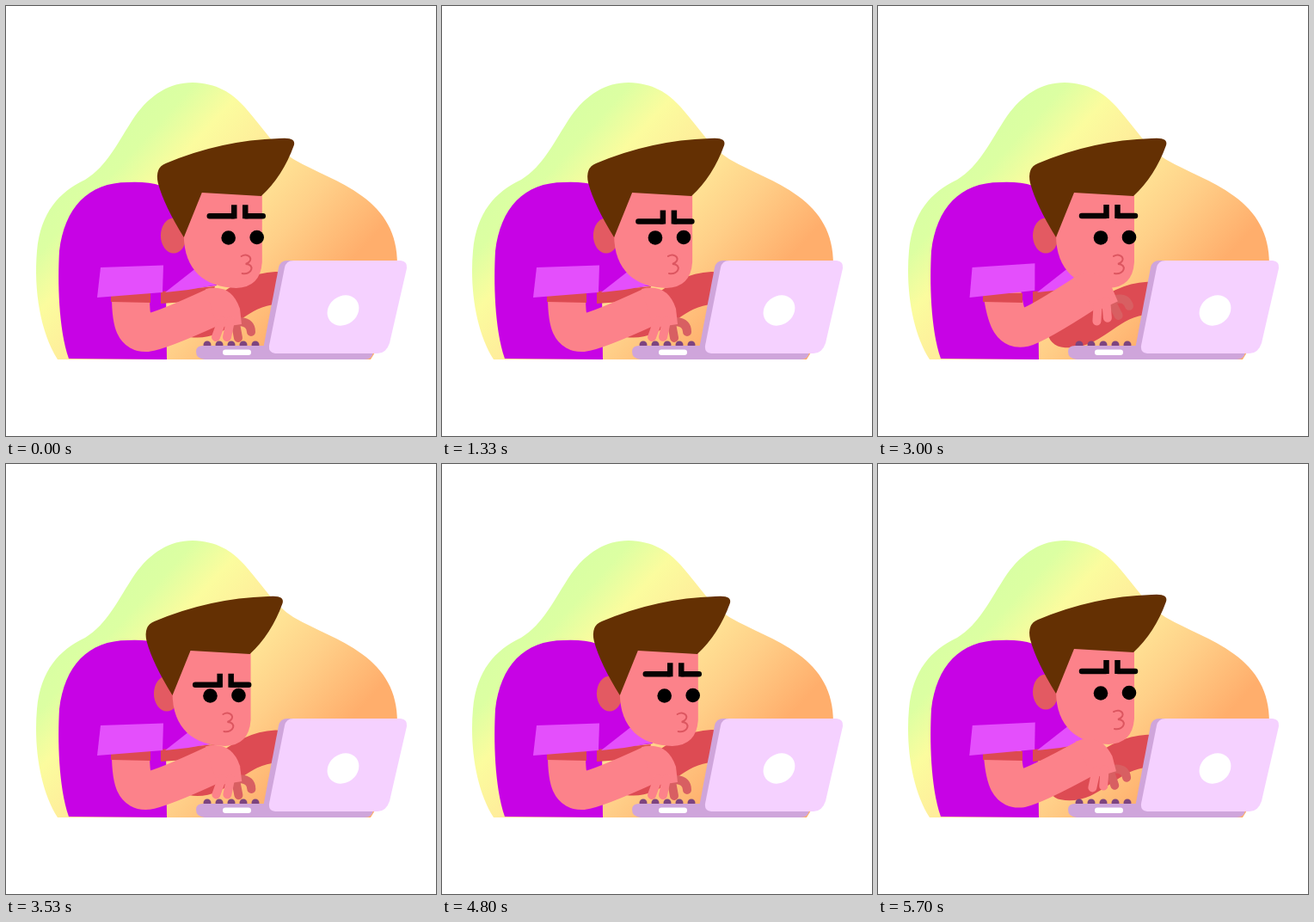
An HTML page without scripts that plays this animation: 500 by 500 pixels, repeating every 5730 ms.

```html
<!DOCTYPE html>
<html lang="en">
<head>
<meta charset="utf-8">
<title>Busy typist</title>
<style>
  /* --t counts typing beats */
  @property --t { syntax: "<number>"; inherits: true; initial-value: 0; }
  @keyframes beat { from { --t: 0; } to { --t: 8.357; } }

  html, body { margin: 0; width: 100%; height: 100%; overflow: hidden; background: #fff; }

  /* Each pulse is exp(sharpness * (cos(turn from its peak) - 1)) */
  svg {
    display: block; width: 100vw; height: 100vh;
    animation: beat 5.73s linear infinite;
    --nod: exp(17 * (cos(360deg * (var(--t) - .147)) - 1));
    --dip: exp(45 * (cos(360deg * (var(--t) - .937)) - 1));
    --hop: exp(40 * (cos(360deg * (var(--t) - .285)) - 1));
    --leap: exp(25 * (cos(360deg * (var(--t) - .817)) - 1));
    --lean: (13.5 * var(--nod) + 7 * var(--dip));
    --lift: (4 * var(--hop) + 17 * var(--leap));
    --reach: (16 * exp(2.2 * (cos(360deg * (var(--t) - .5)) - 1)) - .2);
  }

  .head { transform: translate(calc(var(--lean) * -1px), calc(var(--lift) * -1px)); }
  .ear { transform: translateX(calc(var(--lean) * .4px)); }
  .face { transform: translate(calc(var(--lean) * -.6px), calc(var(--lift) * -.5px)); }
  .brows { transform: translate(calc(var(--lean) * .35px), calc(var(--lean) * .95px)); }
  .far { transform: translateY(calc(var(--reach) * 1.4px)); }
  .arm { transform-origin: 145px 340px; transform: translateY(calc(var(--reach) * -.3px)) rotate(calc(var(--reach) * -1deg)); }
  .hand { transform-origin: 243px 350px; transform: rotate(calc(var(--reach) * -1deg)); }
  .sleeve { transform-origin: 108px 320px; transform: rotate(calc(var(--reach) * -.2deg)); }

  .skin { fill: #fc828a; }
  .limb { fill: none; stroke: #fc828a; stroke-linecap: round; }
  .shade { fill: #dc4a51; }
  .shirt { fill: #c703e5; }
  .cuff { fill: #e44ffc; }
  .hair { fill: #643003; }
  .brow { fill: none; stroke: #050202; stroke-width: 6.5; }
  .round { stroke-linecap: round; }
  .finger { stroke-width: 10; }
  .dark { stroke: #d85f62; }
</style>
</head>
<body>
<svg viewBox="0 0 500 500">
  <defs>
    <linearGradient id="glow" gradientUnits="userSpaceOnUse" x1="140" y1="100" x2="380" y2="320">
      <stop offset="0" stop-color="#d6ffa3"/>
      <stop offset=".16" stop-color="#dcffa2"/>
      <stop offset=".3" stop-color="#fbfc9e"/>
      <stop offset=".5" stop-color="#ffeb9a"/>
      <stop offset=".75" stop-color="#ffcf88"/>
      <stop offset="1" stop-color="#ffae6c"/>
    </linearGradient>
    <circle id="key" r="4.5" cy="394" fill="#7d447f"/>
  </defs>

  <path fill="url(#glow)" d="M60 411C40 380 32 330 36 285C40 240 62 216 92 202C118 186 130 158 150 128C168 103 190 89 217 89C245 90 262 100 278 118C300 143 312 164 334 178C362 194 388 202 414 221C440 240 455 264 455 300Q452 370 424 411Z"/>
  <path class="shirt" d="M73 410C61 375 60 320 62 285C68 235 95 205 142 205Q165 204 180 209C215 226 230 290 245 325L186 333L187 411Z"/>

  <!-- far arm -->
  <path class="limb far" stroke-width="38" style="stroke:#dd4b53" d="M216 366C250 372 268 330 314 328"/>
  <path class="shade" d="M180 332L243 326L238 342L180 346Z"/>
  <path class="cuff" d="M185 333L222 304L246 324L212 330Z"/>

  <g class="head">
    <ellipse class="ear" cx="195" cy="267" rx="15" ry="20.5" fill="#e35a62"/>
    <path class="skin" d="M226 210H298V298Q296 327 268 328C232 327 207 308 207 266Z"/>
    <path class="hair" d="M177 206Q173 188 186 183Q250 156 318 154Q338 152 335 162Q322 198 297 221L228 217L207 269Q184 232 177 206Z"/>
    <g class="face">
      <circle cx="259" cy="269.5" r="8.3"/>
      <circle cx="292" cy="269" r="8.3"/>
      <path class="round" d="M274 291C283 286 290 296 279 300C290 300 287 313 275 311" fill="none" stroke="#dc5660" stroke-width="2"/>
      <g class="brows">
        <path class="brow round" d="M237 244H265M279 244H299"/>
        <path class="brow" d="M265.500 231V247M278.500 231V247"/>
      </g>
    </g>
  </g>

  <!-- near arm -->
  <g class="arm">
    <path class="limb" stroke-width="44" d="M145 338C145 370 150 381 164 380Q180 378 241 350"/>
    <g class="hand">
      <path class="limb finger dark" d="M272 367Q285 368 285 379M266 364L270 386"/>
      <path class="skin" d="M232 329Q262 322 272 352L274 370L246 374Z"/>
      <path class="limb finger" d="M261 366L257 385M251 366L244 385"/>
    </g>
  </g>
  <path class="shade" d="M122 334H168V345L122 344Z"/>
  <path class="cuff sleeve" d="M110 304L183 301.500L182 333L106 339Z"/>

  <!-- laptop -->
  <use href="#key" x="234"/>
  <use href="#key" x="248"/>
  <use href="#key" x="262"/>
  <use href="#key" x="276"/>
  <use href="#key" x="290"/>
  <g fill="#cfa5db">
    <path d="M229 395H427V402Q426 411 417 411H231Q221 410 221 402Q221 395 229 395Z"/>
    <path d="M327 296H345L315 404H298L317 304Q319 296 327 296Z"/>
  </g>
  <rect x="252" y="399.500" width="33" height="6.500" rx="3.250" fill="#fff"/>
  <path fill="#f5d1ff" d="M334 296H459Q467 297 466 305L446 392Q442 404 432 404H313Q305 403 306 395L324 304Q326 296 334 296Z"/>
  <ellipse cx="392" cy="354" rx="19.500" ry="16.500" transform="rotate(-38 392 354)" fill="#fff"/>
</svg>
</body>
</html>
```
